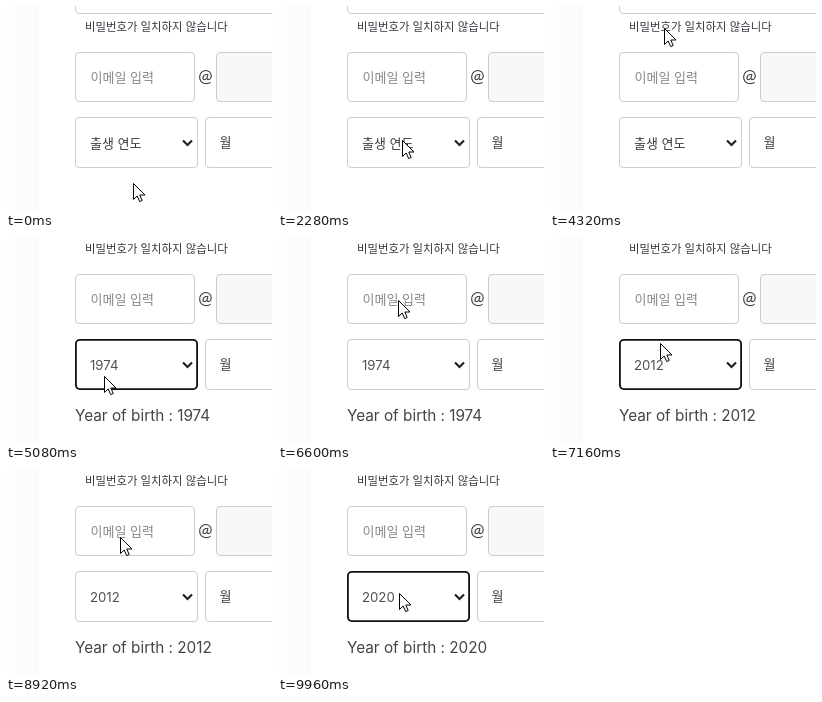
Animation of 266x204 px, one loop 10 s. Source, as an HTML page:

```html
<!DOCTYPE html>
<html lang="ko">
<head>
<meta charset="utf-8">
<title>Year of birth</title>
<style>
html, body { margin: 0; width: 100%; height: 100%; overflow: hidden; background: #fff; }
svg { display: block; width: 266px; height: 204px; }
text { fill: #3c3540; font: 13px "Noto Sans CJK KR", "Noto Sans CJK", sans-serif; }
.note { font-size: 11.4px; }
.hint { fill: #85858c; }
.at { font: 17px Lato, sans-serif; }
.num { fill: #505050; font: 13.2px Inter, sans-serif; }
.out { fill: #444; font: 15.3px Inter, sans-serif; }
.field { fill: #fff; stroke: #ccc; }
.off { fill: #f8f8f8; }
.focus { stroke: #111; stroke-width: 1.8; }
</style>
</head>
<body>
<svg viewBox="0 0 266 204">
  <defs>
    <linearGradient id="shade">
      <stop offset="0" stop-color="#fefefe"/>
      <stop offset="1" stop-color="#fafafa"/>
    </linearGradient>
  </defs>
  <rect width="266" height="204" fill="#fff"/>
  <rect width="33" height="204" fill="url(#shade)"/>
  <g id="form">
    <rect class="field" x="69.5" y="-41.5" width="230" height="49" rx="3.5"/>
    <text class="note" x="79" y="25.3">비밀번호가 일치하지 않습니다</text>
    <rect class="field" x="69.5" y="46.5" width="119" height="49" rx="3.5"/>
    <text class="hint" x="84.5" y="75.5">이메일 입력</text>
    <text class="at" x="199.3" y="75.5" text-anchor="middle">@</text>
    <rect class="field off" x="210.5" y="46.5" width="90" height="49" rx="3.5"/>
    <rect class="field" x="69.5" y="111.5" width="122" height="50" rx="3.5"/>
    <rect id="ring" class="field focus" x="69.9" y="111.9" width="121.2" height="49.2" rx="4"/>
    <text id="year" x="84" y="141.5"></text>
    <path d="M177 134.5l4.5 4.5 4.5-4.5" fill="none" stroke="#222" stroke-width="2.2"/>
    <rect class="field" x="199.5" y="111.5" width="100" height="50" rx="3.5"/>
    <text x="213.5" y="141.3">월</text>
  </g>
  <text id="result" class="out" x="69" y="183"></text>
  <path id="cursor" d="M.5 .5V16.5L4.2 13L6.7 18.6L9.2 17.5L6.8 12H12Z" fill="#fff" stroke="#000"/>
</svg>
<script>
const LOOP = 10000, TICK = 40;
const $ = id => document.getElementById(id);
const form = $('form'), ring = $('ring'), year = $('year'), result = $('result'), cursor = $('cursor');

// Each pick: the pointer rises to the open list, nudges to an entry, clicks and drops back.
const picks = [
  { year: '1974', rise: 3800, click: 4720, listY: 28, x: 108, y: 138 },
  { year: '2012', rise: 5680, click: 7040, listY: 66, x: 120, y: 117 },
  { year: '2020', rise: 7920, click: 9320, listY: 73, x: 121, y: 123 }
];

const moves = [];
const go = (at, ms, x, y) => moves.push({ at, ms, x, y });

go(1480, 440, 124, 134);
go(3080, 440, 118, -22);
for (const { rise, click, listY, x, y } of picks) {
  go(rise, 240, 130, listY);
  go(click - 480, 280, 109, listY - 8);
  go(click, 360, x - 10, y);
  go(click + 360, 280, x, y);
}

const easeOut = p => 1 - (1 - p) ** 4;

function pointer(t) {
  let x = 127, y = 177;
  for (const m of moves) {
    if (t <= m.at) break;
    const p = easeOut(Math.min(1, (t - m.at) / m.ms));
    x += (m.x - x) * p;
    y += (m.y - y) * p;
  }
  return [x, y];
}

function draw(t) {
  const pick = picks.findLast(p => t > p.click);
  const reopened = picks.some(p => pick && p.rise > pick.click && t >= p.rise - 120);
  form.setAttribute('transform', `translate(0 ${pick ? -10 : 0})`);
  ring.style.display = pick && !reopened ? '' : 'none';
  year.textContent = pick ? pick.year : '출생 연도';
  year.setAttribute('class', pick ? 'num' : '');
  result.textContent = pick ? `Year of birth : ${pick.year}` : '';
  const [x, y] = pointer(t).map(Math.round);
  cursor.setAttribute('transform', `translate(${x} ${y})`);
}

const start = performance.now();
function loop() {
  const t = (performance.now() - start) % LOOP;
  draw(Math.floor(t / TICK) * TICK);
  requestAnimationFrame(loop);
}
draw(0);
requestAnimationFrame(loop);
</script>
</body>
</html>
```
